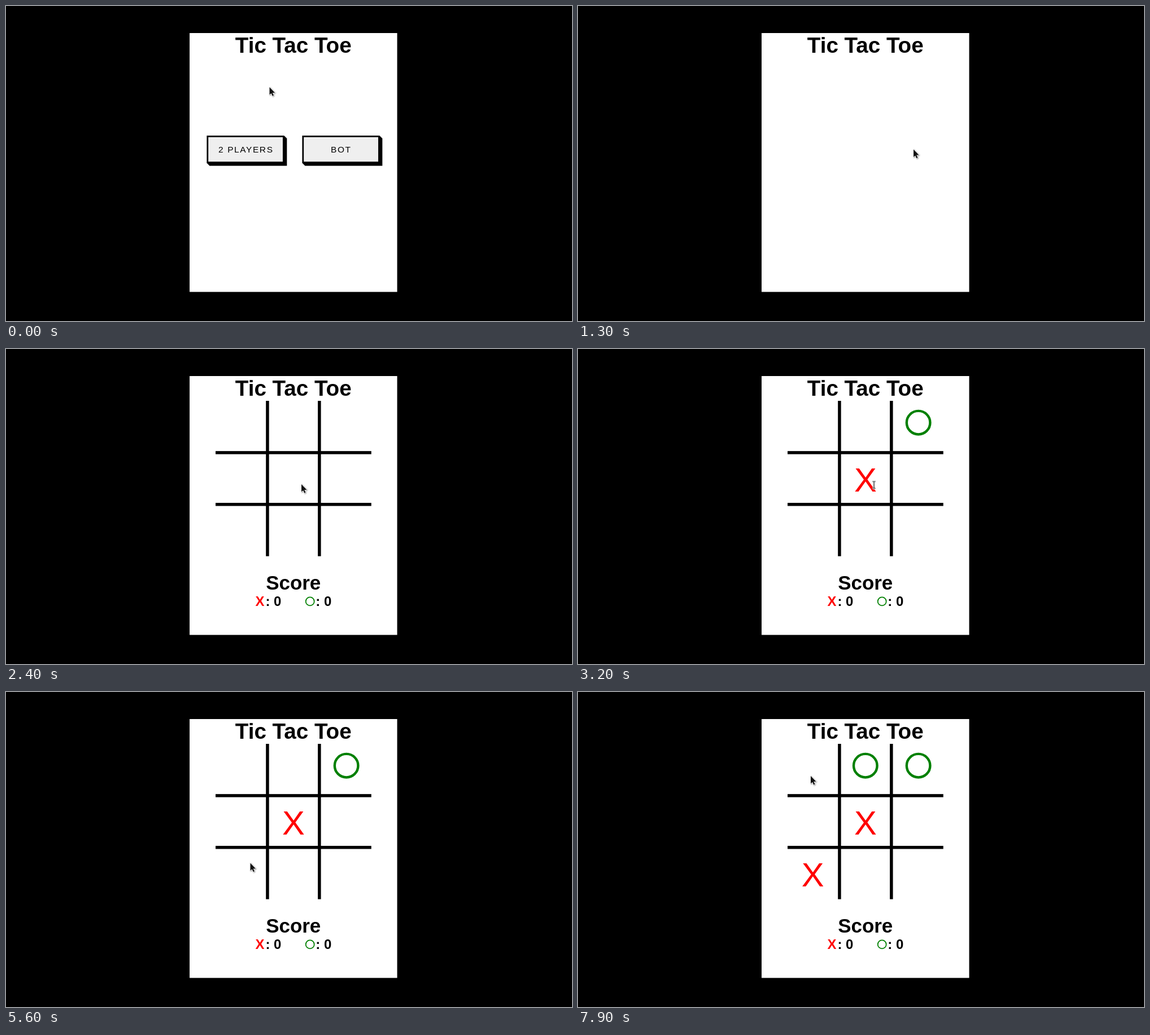
An HTML page with a canvas that plays this animation: 1002 px wide and 559 px high, repeating every 8000 ms.

```html
<!DOCTYPE html>
<html lang="en">
<head>
<meta charset="utf-8">
<title>Tic Tac Toe</title>
<style>
  html, body { margin: 0; width: 100%; height: 100%; overflow: hidden; background: #000; }
  canvas { display: block; }
</style>
</head>
<body>
<canvas id="stage" width="1002" height="559"></canvas>
<script>
const ctx = document.getElementById('stage').getContext('2d');
const LOOP = 8000;
const SCALE = 0.919;
const MID = 508.7;
const CELL = 91.9;
const RED = '#f00', GREEN = '#008000';

// Pointer track: [start ms, x, y, cursor]
const track = [
  [0, 466.5, 144, 'arrow'],
  [100, 467.5, 146, 'arrow'],
  [300, 497, 172, 'arrow'],
  [400, 562, 222, 'arrow'],
  [500, 594, 254.5, 'hand'],
  [1300, 594, 254.5, 'arrow'],
  [2200, 576, 250, 'arrow'],
  [2300, 537, 243, 'arrow'],
  [2400, 523, 240, 'arrow'],
  [3200, 524, 241.3, 'beam'],
  [5000, 523, 241.3, 'beam'],
  [5200, 509, 253, 'beam'],
  [5300, 485.7, 273.5, 'arrow'],
  [5500, 455, 291, 'arrow'],
  [5600, 432.5, 303.5, 'arrow'],
  [5800, 430, 306.5, 'arrow'],
  [6200, 431.5, 307.3, 'beam'],
  [7200, 427, 268, 'arrow'],
  [7300, 421, 217, 'arrow'],
  [7500, 416, 181, 'arrow'],
  [7600, 412.7, 150, 'arrow'],
  [7900, 412, 149, 'arrow']
];

function text(str, x, y, size, { color = '#000', weight = 'bold', align = 'left', spacing = 0 } = {}) {
  ctx.font = `${weight} ${size}px "Liberation Sans", Arial, sans-serif`;
  ctx.letterSpacing = spacing + 'px';
  ctx.textAlign = align;
  ctx.fillStyle = color;
  ctx.fillText(str, x, y);
}

function ring(x, y, r, width) {
  ctx.beginPath();
  ctx.arc(x, y, r, 0, Math.PI * 2);
  ctx.lineWidth = width;
  ctx.strokeStyle = GREEN;
  ctx.stroke();
}

function cross(x, baseline) {
  text('X', x, baseline, 59.7, { color: RED, weight: 'normal', align: 'center' });
}

function button(x, label, labelX) {
  const y = 230, w = 137.3, h = 49, border = 3 * SCALE;
  ctx.fillStyle = '#000';
  for (let i = 0; i <= 5; i++) ctx.fillRect(x + i * SCALE, y + i * SCALE, w, h);
  ctx.fillStyle = '#efefef';
  ctx.fillRect(x + border, y + border, w - 2 * border, h - 2 * border);
  text(label, labelX, 259.8, 15.4, { weight: 'normal', spacing: 1.65 });
}

function menu() {
  button(355.4, '2 PLAYERS', 376);
  button(524.4, 'BOT', 575);
}

function board() {
  const left = 371, top = 92, size = 3 * CELL, line = 6 * SCALE;
  ctx.fillStyle = '#000';
  for (let i = 1; i < 3; i++) {
    ctx.fillRect(left + i * CELL - line / 2, top, line, size);
    ctx.fillRect(left, top + i * CELL - line / 2, size, line);
  }
  text('Score', MID, 426.9, 34.9, { align: 'center' });
  text('X', 441.4, 456.2, 23.9, { color: RED });
  text(': 0', 459.5, 456.2, 23.9);
  ring(538.2, 447.9, 7.5, 1.8);
  text(': 0', 548.3, 456.2, 23.9);
}

function marks(t) {
  if (t >= 3100) {
    cross(508.8, 252.8);
    ring(602.6, 130.7, 20.8, 4.4);
  }
  if (t >= 6200) {
    cross(415.7, 344.7);
    ring(508.8, 130.7, 20.8, 4.4);
  }
}

const arrowShape = new Path2D('M0 0V13.6L3.1 10.9L5.3 15.8L7.5 14.8L5.3 10H9.6Z');
const handShape = new Path2D(
  'M-1 0C-1-2 2-2 2 0V5C3 4 5 4 5.5 5.5C7 4.5 8.5 5 9 6.5C11 5.5 13 6.5 13 8.5' +
  'V10C13 12 11.5 13 11 14H1.5C0 11-3 9-4.5 7C-5 5.5-3.5 5-2.5 6L-1 7.5Z');
const beamShape = new Path2D('M-2.5-6H-1L0-5L1-6H2.5M0-5V5M-2.5 6H-1L0 5L1 6H2.5');

function solidCursor(shape) {
  ctx.lineJoin = 'round';
  ctx.lineWidth = 1.5;
  ctx.strokeStyle = '#fff';
  ctx.shadowColor = 'rgba(0,0,0,.45)';
  ctx.shadowBlur = 2;
  ctx.shadowOffsetX = ctx.shadowOffsetY = 0.8;
  ctx.stroke(shape);
  ctx.shadowColor = 'transparent';
  ctx.fillStyle = '#111';
  ctx.fill(shape);
}

const cursors = {
  arrow: () => solidCursor(arrowShape),
  hand: () => solidCursor(handShape),
  beam() {
    for (const [color, width] of [['#aaa', 3.4], ['#fff', 2.6], ['#222', 1.1]]) {
      ctx.strokeStyle = color;
      ctx.lineWidth = width;
      ctx.stroke(beamShape);
    }
  }
};

function pointer(t) {
  const [, x, y, kind] = track.findLast(step => step[0] <= t);
  ctx.save();
  ctx.translate(x, y);
  cursors[kind]();
  ctx.restore();
}

function draw(t) {
  ctx.fillStyle = '#000';
  ctx.fillRect(0, 0, 1002, 559);
  ctx.fillStyle = '#fff';
  ctx.fillRect(325, 48, 367.5, 459.4);
  text('Tic Tac Toe', MID, 83.1, 38.6, { align: 'center' });
  if (t < 1300) menu();
  if (t >= 1800) board();
  marks(t);
  pointer(t);
}

const start = performance.now();
function tick() {
  draw((performance.now() - start) % LOOP);
  requestAnimationFrame(tick);
}
tick();
</script>
</body>
</html>
```
